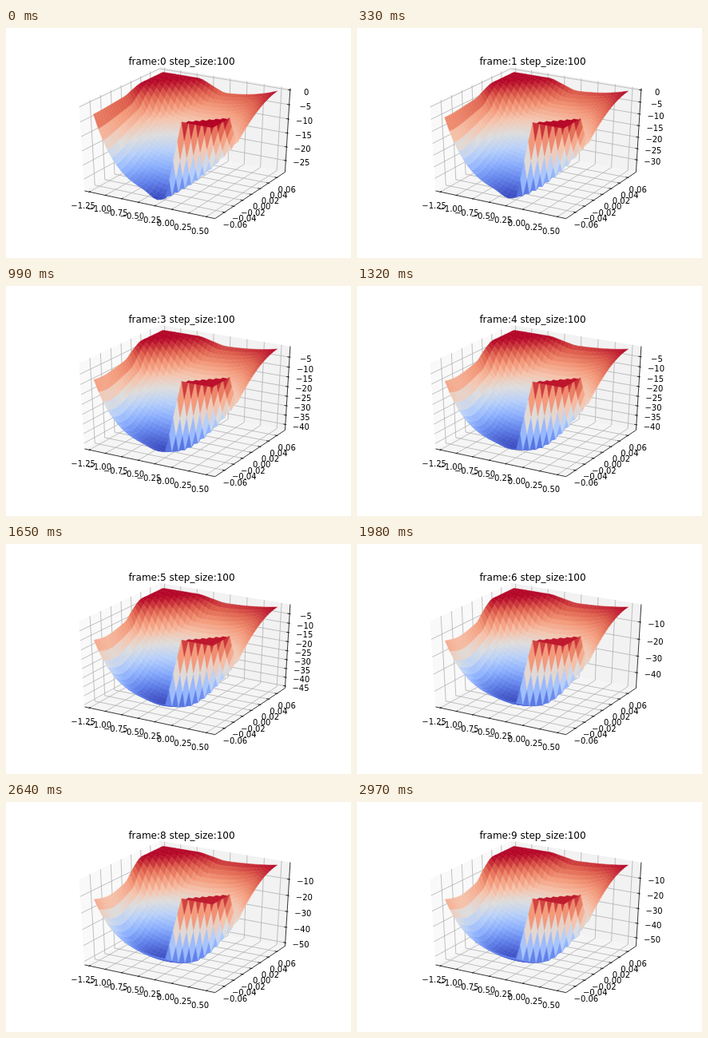
Animation of 432 by 288 pixels, one loop 3300 ms. Source, as an HTML page with a canvas:

```html
<!DOCTYPE html>
<html lang="en">
<head>
<meta charset="utf-8">
<title>Surface</title>
<style>
html, body { margin: 0; width: 100%; height: 100%; overflow: hidden; background: #fff; }
canvas { display: block; }
</style>
</head>
<body>
<canvas id="stage" width="432" height="288"></canvas>
<script>
const ctx = document.getElementById('stage').getContext('2d');
const STEP = 330, COUNT = 10, N = 28;
const EDGE = 0.5 + 1 / 48;   // half size of the padded box
const LABEL = EDGE + 0.0833; // distance of the tick labels

// lowest value reached at each step
const LOW = [-28.7, -34.8, -39, -42.2, -42, -45.3, -48.5, -50, -51.2, -54.7];
const COOLWARM = [
  [59, 76, 192], [98, 130, 234], [141, 176, 254], [184, 208, 249], [221, 221, 221],
  [245, 196, 173], [244, 154, 123], [222, 96, 77], [180, 4, 38]
];

const mix = (a, b, t) => a + (b - a) * t;
const clamp = v => Math.min(1, Math.max(0, v));
const ramp = (a, b, v) => clamp((v - a) / (b - a));
const depth = ([x, y, z]) => 0.433 * x - 0.75 * y + 0.5 * z;

// perspective view of the centred unit cube: azimuth -60, elevation 30
function project([x, y, z]) {
  const w = 10 - depth([x, y, z]);
  const px = (0.866 * x + 0.5 * y) / w;
  const py = (-0.25 * x + 0.433 * y + 0.866 * z) / w;
  return [54 + (px + 0.095) * 1809.73, 252 - (py + 0.095) * 1175.35];
}

// relative height at position x and velocity v, both 0 to 1;
// age 0 is the first shape of the valley, 1 the last
function height(x, v, age) {
  const floor = 0.02 + mix(0.92, 1.3, age) * (Math.hypot(v - 0.2 * age, 0.1) - 0.1);
  const left = mix(0.9, 0.72, age) * Math.exp(-x / 0.18);
  const right = (0.2 + 0.8 * v) * x ** 4;
  const dent = 0.07 * (1 - age) * Math.exp(-(((x - 0.53) / 0.08) ** 2) - (v / 0.15) ** 2);
  const valley = floor + (1 - floor) * (left + right) - dent;
  // the corners never visited stay high, behind diagonal cliffs
  const back = mix(valley, 1, ramp(0.45, 0.66, v - x));
  return clamp(mix(back, mix(1, 0.97, age), ramp(0.61, 0.75, x - v)));
}

function colour(s) {
  const t = clamp(s) * 8, i = Math.min(7, Math.floor(t));
  return `rgb(${COOLWARM[i].map((c, k) => Math.round(mix(c, COOLWARM[i + 1][k], t - i)))})`;
}

function path(points) {
  ctx.beginPath();
  points.forEach(p => ctx.lineTo(...project(p)));
}

function line(style, ...points) {
  path(points);
  ctx.strokeStyle = style;
  ctx.lineWidth = 0.8;
  ctx.stroke();
}

function pane(style, ...points) {
  path(points);
  ctx.fillStyle = style;
  ctx.fill();
}

function text(str, x, y, size) {
  ctx.font = `${size}px "DejaVu Sans", sans-serif`;
  ctx.textAlign = 'center';
  ctx.fillStyle = '#000';
  ctx.fillText(str.replace('-', '\u2212'), x, y);
}

function label(str, point) {
  const [x, y] = project(point);
  text(str, x, Math.round(y + 8), 10);
}

function drawAxes(low, high) {
  const e = EDGE, l = LABEL, out = e + 0.0083, inn = e - 0.0167;
  const grid = '#b0b0b0', ink = '#000';
  pane('#f9f9f9', [-e, -e, -e], [-e, e, -e], [-e, e, e], [-e, -e, e]);
  pane('#f2f2f2', [-e, e, -e], [e, e, -e], [e, e, e], [-e, e, e]);
  pane('#f5f5f5', [-e, -e, -e], [e, -e, -e], [e, e, -e], [-e, e, -e]);

  const ticks = [];
  for (let i = 0; i < 8; i++) {
    const value = -1.25 + i * 0.25, x = (value + 0.35) / 1.87;
    line(grid, [x, -e, -e], [x, e, -e], [x, e, e]);
    ticks.push([value.toFixed(2), [x, -out, -e], [x, -inn, -e], [x, -l, -l]]);
  }
  for (let i = -3; i <= 3; i++) {
    const value = i * 0.02, y = value / 0.154;
    line(grid, [e, y, -e], [-e, y, -e], [-e, y, e]);
    ticks.push([value.toFixed(2), [out, y, -e], [inn, y, -e], [l, y, -l]]);
  }
  const step = high - low > 45 ? 10 : 5;
  for (let value = 0; value >= low; value -= step) {
    if (value > high) continue;
    const z = (value - low) / (high - low) - 0.5;
    line(grid, [e, e, z], [-e, e, z], [-e, -e, z]);
    ticks.push([String(value), [out, e, z], [inn, e, z], [l, l, z]]);
  }
  line(ink, [-e, -e, -e], [e, -e, -e], [e, e, -e], [e, e, e]);
  for (const [str, from, to, at] of ticks) {
    line(ink, from, to);
    label(str, at);
  }
}

function drawSurface(age) {
  const point = (i, j) => [
    (i / N - 0.5) / 1.1, (j / N - 0.5) / 1.1, height(i / N, j / N, age) - 0.5
  ];
  const quads = [];
  for (let j = 0; j < N; j++) {
    for (let i = 0; i < N; i++) {
      const q = [point(i, j), point(i + 1, j), point(i + 1, j + 1), point(i, j + 1)];
      const mean = f => q.reduce((sum, p) => sum + f(p), 0) / 4;
      quads.push({ q, z: mean(p => p[2]), near: mean(depth) });
    }
  }
  const zs = quads.map(o => o.z), min = Math.min(...zs), max = Math.max(...zs);
  quads.sort((a, b) => a.near - b.near);
  ctx.lineWidth = 0.5;
  for (const { q, z } of quads) {
    path(q);
    ctx.closePath();
    ctx.fillStyle = ctx.strokeStyle = colour((z - min) / (max - min));
    ctx.fill();
    ctx.stroke();
  }
}

let shown = -1;
function draw(now) {
  const k = Math.floor(now / STEP) % COUNT;
  if (k !== shown) {
    shown = k;
    ctx.fillStyle = '#fff';
    ctx.fillRect(0, 0, 432, 288);
    ctx.lineJoin = 'round';
    drawAxes(LOW[k], -Math.min(0.9, 0.25 * Math.max(0, k - 1)));
    drawSurface(1 - (1 - k / 9) ** 2);
    text(`frame:${k} step_size:100`, 220, 46, 12);
  }
  requestAnimationFrame(draw);
}
draw(0);
</script>
</body>
</html>
```
